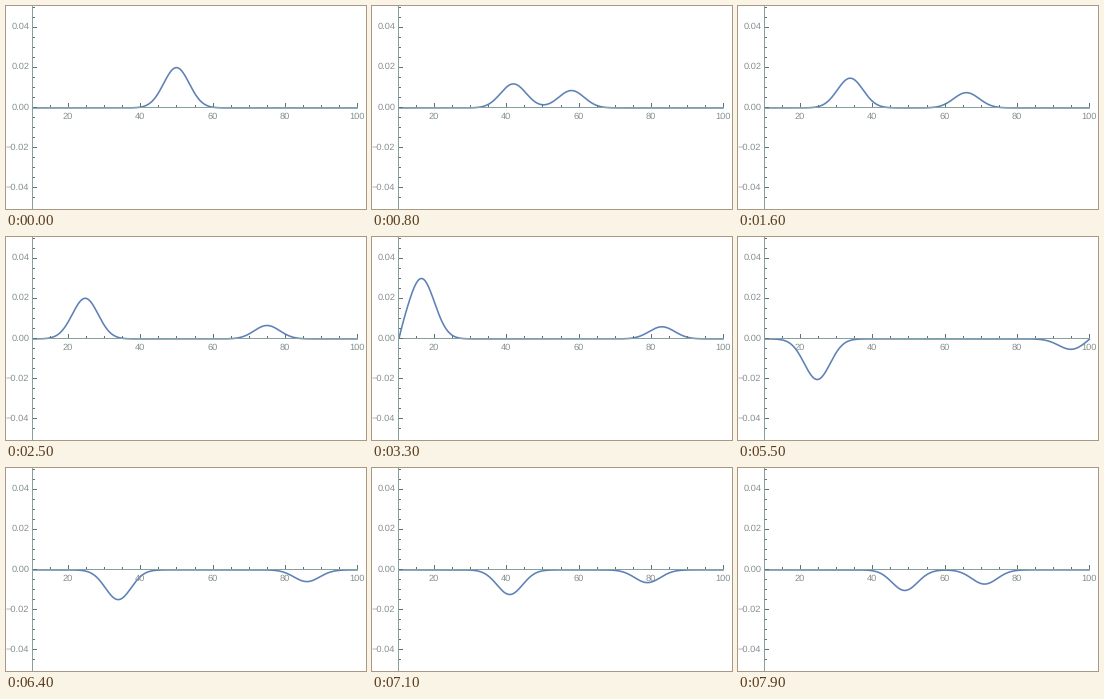
A matplotlib script that plays this animation: 360x203 px, repeating every 8000 ms.

```python
import numpy as np
import matplotlib.pyplot as plt
from matplotlib.animation import FuncAnimation

plt.rcParams["text.hinting"] = "none"

W, H, DPI = 360, 203, 64
PX = 72 / DPI  # points per pixel
R0, R1 = 10, 100
FRAMES, INTERVAL = 80, 100
BLUE = (0.368417, 0.506779, 0.709798)
AXIS = "#86a0a0"
TICK = "#5f7272"
LABEL = "#84908e"


def to_x(r):
    return 26.9 + (r - R0) * 325 / (R1 - R0)


def to_y(u):
    return 101.9 - u * 2010


def pulse(s):
    """Odd, periodic extension of a Gaussian: fixed at both ends."""
    span = R1 - R0
    total = 0
    for k in range(-2, 3):
        shift = 2 * span * k
        total = total + np.exp(-(s - 50 - shift) ** 2 / 25)
        total = total - np.exp(-(2 * R0 - s - 50 - shift) ** 2 / 25)
    return total


def wave(r, t):
    """Spherical wave: two half pulses running in and out, divided by r."""
    return (pulse(r - t) + pulse(r + t)) / (2 * r)


fig = plt.figure(figsize=(W / DPI, H / DPI), dpi=DPI, facecolor="white")
ax = fig.add_axes([0, 0, 1, 1])
ax.set_xlim(0, W)
ax.set_ylim(H, 0)
ax.axis("off")


def pixel(v):
    """Left or top edge of the pixel that a hairline at v fills."""
    return int(np.floor(v - 0.4))


def box(x, y, w, h, color, z):
    ax.add_patch(plt.Rectangle((x, y), w, h, fc=color, ec="none", lw=0,
                               antialiased=False, zorder=z))


def label(x, y, text, ha):
    ax.text(x, y, text, color=LABEL, fontsize=9.2 * PX, ha=ha,
            va="center_baseline", family="Liberation Sans", zorder=5)


left, right, base = pixel(to_x(R0)), pixel(to_x(R1)), pixel(to_y(0))
box(left, 0, 1, H, AXIS, 3)
box(left, base, right - left + 1, 1, AXIS, 3)

for r in range(15, R1 + 1, 5):
    major = r % 20 == 0
    size = 4 if major else 2
    box(pixel(to_x(r)), base - size, 1, size, TICK, 4)
    if major:
        label(to_x(r) - 0.9, 109.4, str(r), "center")

for i in range(-9, 11):
    major = i % 4 == 0
    y = to_y(i * 0.005)
    box(left + 1, pixel(y), 4 if major else 2, 1, TICK, 4)
    if major:
        text = f"{i * 0.005:.2f}".replace("-", "\u2212")
        label(23.2, y - 1.7, text, "right")

r = np.linspace(R0, R1, 721)
curve, = ax.plot(to_x(r), to_y(wave(r, 0)), color=BLUE, lw=1.6 * PX,
                 solid_capstyle="butt", zorder=2)


def update(i):
    curve.set_ydata(to_y(wave(r, i)))
    return curve,


anim = FuncAnimation(fig, update, frames=FRAMES, interval=INTERVAL,
                     repeat=True, repeat_delay=0, blit=False)
plt.show()
```
